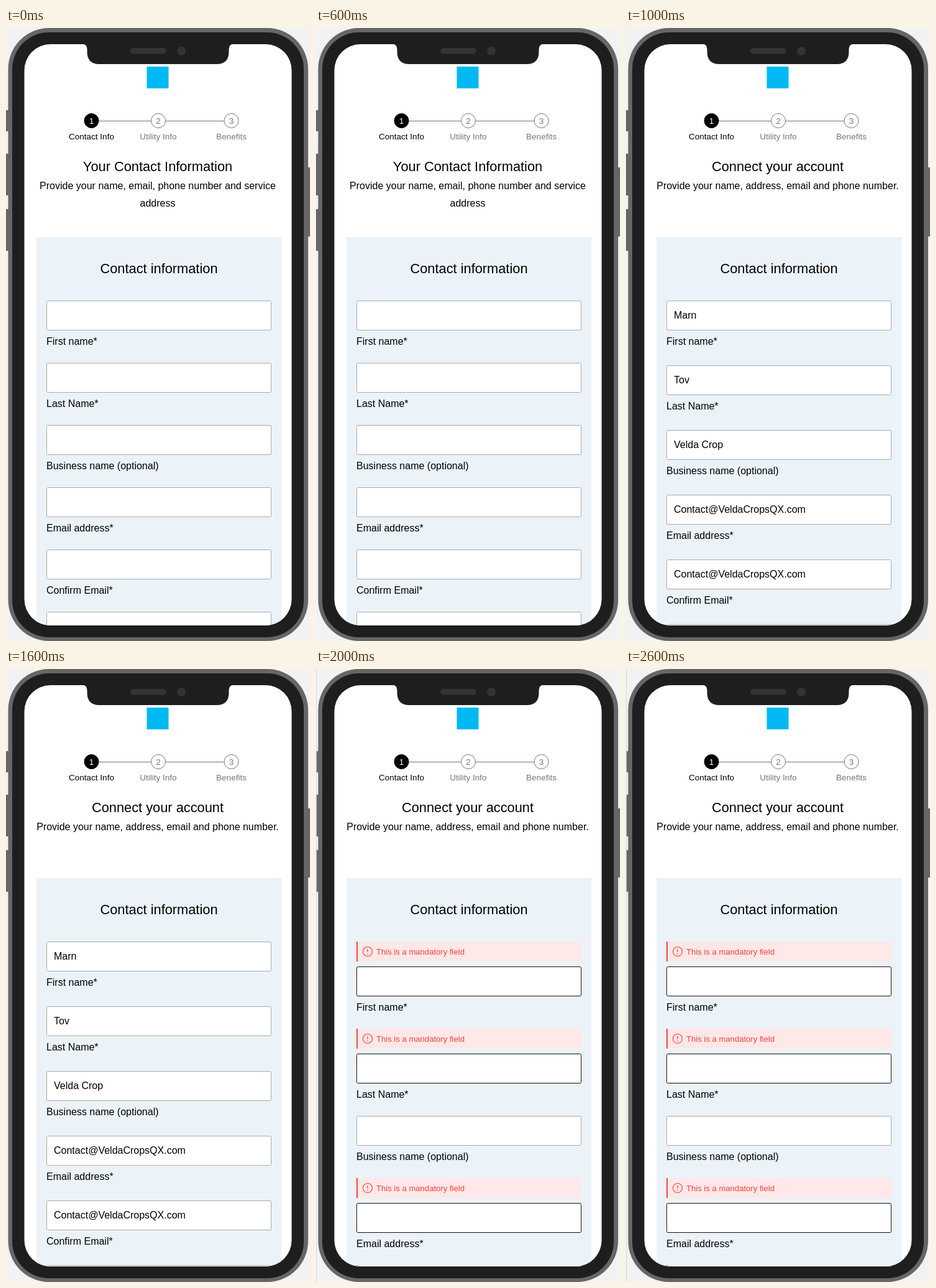
An HTML page that plays this animation: 489 by 985 pixels, repeating every 3 s.

```html
<!DOCTYPE html>
<html lang="en">
<head>
<meta charset="utf-8">
<title>Contact form</title>
<style>
  html, body { margin: 0; height: 100%; overflow: hidden; background: #f2f2f2; }
  svg { display: block; font: 16px "Liberation Sans", Arial, sans-serif; }
  .mid { text-anchor: middle; }
  .title { font-size: 21.8px; }
  .step { font-size: 13.5px; }
  .error { font-size: 13.1px; fill: #fb413d; }
</style>
</head>
<body>
<svg width="489" height="985" viewBox="0 0 489 985">
  <defs>
    <clipPath id="screen"><rect x="29.5" y="26" width="430" height="934" rx="42"/></clipPath>
  </defs>

  <g fill="#666">
    <rect x="-4" y="132" width="12" height="34" rx="2"/>
    <rect x="-4" y="202" width="12" height="67" rx="2"/>
    <rect x="-4" y="291" width="12" height="67" rx="2"/>
    <rect x="481" y="224" width="12" height="111" rx="2"/>
    <rect x="3.5" y="0" width="482.5" height="985" rx="66"/>
  </g>
  <rect x="10" y="7" width="469" height="972" rx="59" fill="#1e1e1e"/>

  <g clip-path="url(#screen)">
    <rect x="29" y="26" width="431" height="934" fill="#fff"/>
    <rect x="226.5" y="62" width="35" height="35" fill="#00b9f2"/>
    <path d="M137 149.5H362" stroke="#777"/>
    <g id="steps" class="mid step"></g>
    <rect x="49" y="336" width="394" height="624" fill="#ebf3f9"/>
    <text class="mid title" x="246" y="393.5">Contact information</text>
    <g id="form"></g>
  </g>

  <path d="M122 25Q130.500 26 130.500 34V38Q130.500 58 150 58H339Q358.500 58 358.500 38V34Q358.500 26 367 25Z" fill="#1e1e1e"/>
  <rect x="200" y="32" width="58" height="9.500" rx="4.700" fill="#333"/>
  <circle cx="282" cy="37" r="7" fill="#333"/>
  <path id="edge" d="M.5 0V985" stroke="#d8d8d8"/>
</svg>

<script>
const $ = id => document.getElementById(id);

const fields = ["First name*", "Last Name*", "Business name (optional)",
  "Email address*", "Confirm Email*", ""];

const connect = {
  title: "Connect your account",
  lines: ["Provide your name, address, email and phone number."]
};
const email = "Contact@VeldaCropsQX.com";

const states = [
  {
    title: "Your Contact Information",
    lines: ["Provide your name, email, phone number and service", "address"],
    values: [], pitch: 100
  },
  { ...connect, values: ["Marn", "Tov", "Velda Crop", email, email], pitch: 104 },
  { ...connect, values: [], pitch: 100, errors: true }
];

const text = (x, y, str, cls = "", fill = "#000") =>
  `<text x="${x}" y="${y}" class="${cls}" fill="${fill}">${str}</text>`;

const step = (x, label, i) => {
  const active = i === 0, ink = active ? "#000" : "#777";
  return `<circle cx="${x}" cy="149" r="11.5" fill="${active ? "#000" : "#fff"}" stroke="${ink}"/>`
    + text(x, 153.5, i + 1, "", active ? "#fff" : ink)
    + text(x, 179, label, "", ink);
};

const errorBar = y => `
  <rect x="65" y="${y}" width="362" height="32" rx="3" fill="#ffe8e7"/>
  <path d="M66 ${y}v32" stroke="#fb413d" stroke-width="2"/>
  <circle cx="83" cy="${y + 16}" r="7.5" fill="none" stroke="#fb413d" stroke-width="1.2"/>
  <path d="M83 ${y + 12}v5m0 2v1.500" stroke="#fb413d" stroke-width="1.3"/>
  <text class="error" x="97" y="${y + 20.5}">This is a mandatory field</text>`;

const input = (y, value, label, border) => `
  <rect x="65.500" y="${y + 0.5}" width="361" height="47" rx="2" fill="#fff" stroke="${border}"/>`
  + text(77, y + 29, value) + text(65, y + 71, label);

function form({ title, lines, values, pitch, errors }) {
  let y = 438;
  let out = text(244, 230, title, "mid title");
  lines.forEach((line, i) => out += text(244, 259 + 28 * i, line, "mid"));
  fields.forEach((label, i) => {
    const invalid = errors && label.endsWith("*");
    if (invalid) {
      out += errorBar(y);
      y += 40;
    }
    out += input(y, values[i] || "", label, invalid ? "#111" : "#aaa");
    y += pitch;
  });
  return out;
}

$("steps").innerHTML = step(137.5, "Contact Info", 0)
  + step(245, "Utility Info", 1) + step(362.5, "Benefits", 2);

let shown = -1;
function draw() {
  const current = Math.floor(performance.now() / 1000) % states.length;
  if (current !== shown) {
    shown = current;
    $("form").innerHTML = form(states[current]);
    $("edge").style.display = states[current].errors ? "" : "none";
  }
  requestAnimationFrame(draw);
}
draw();
</script>
</body>
</html>
```
